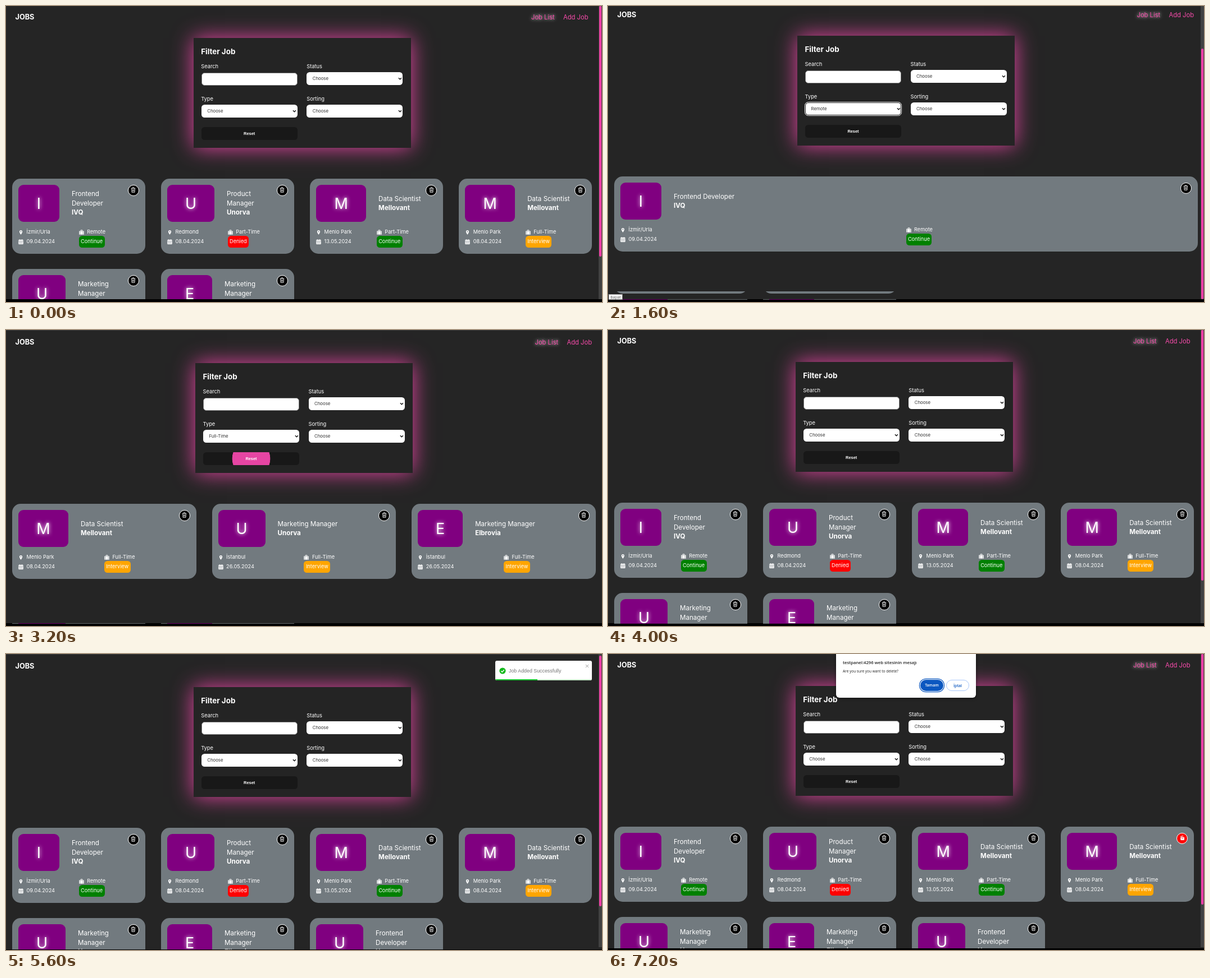
Animation of 1061x528 px, one loop 8 s. Source, as an HTML page:

```html
<!DOCTYPE html>
<html lang="en">
<head>
<meta charset="utf-8">
<title>Jobs</title>
<style>
html, body { margin: 0; width: 100%; height: 100%; overflow: hidden; background: #000; }
#stage { position: relative; width: 1061px; height: 528px; overflow: hidden; background: #000;
  color: #fff; font: 9.2px Inter, sans-serif; }
#stage div, #stage svg { position: absolute; box-sizing: border-box; }
.t { line-height: 20px; white-space: nowrap; }
.page { left: 0; top: 0; width: 1061px; background: #252525; overflow: hidden; }
.panel { width: 387px; background: #242424; box-shadow: 0 0 36px #e645a3; }
.field { width: 171px; height: 23px; border-radius: 5.5px; background: #fff; color: #333; }
.input { border: 1px solid #777; border-width: .6px 1.3px 1.3px .6px; }
.focus { outline: 1px solid #fff; box-shadow: inset 0 0 0 1px #111; outline-offset: .4px; }
.button { width: 171px; height: 23px; border-radius: 5.5px; background: #181818;
  font: bold 7.4px/23px "Liberation Sans", Arial, sans-serif; text-align: center; }
.hover { background: radial-gradient(circle, #e645a3 33.5px, #181818 34.2px); }
.link { color: #f84bab; font-size: 11.2px; }
.active { text-shadow: 0 0 5px #aaa, 0 0 9px #999; }
.card { height: 133.5px; border-radius: 15px; background: #727a7f; }
.avatar { left: 11px; top: 11px; height: 66px; border-radius: 9px; background: #800080;
  font-size: 27px; line-height: 67px; text-align: center; text-shadow: 0 0 7px #fff; }
.role { top: 11px; height: 66px; display: flex; flex-direction: column; justify-content: center;
  font-size: 11.6px; line-height: 16.5px; }
.badge { top: 102px; height: 20.5px; padding: 0 3.4px; border-radius: 5.5px; line-height: 20.5px; }
.trash { top: 10.5px; width: 20px; height: 20px; border-radius: 50%; background: #000; border: 1.4px solid #fff; }
.alert { background: #f00; }
.tip { left: 1px; top: 513.5px; width: 25px; height: 10px; background: #fff; border: .6px solid #999;
  color: #555; font: 6.6px/9px "Open Sans", sans-serif; text-align: center; }
.toast { left: 871px; top: 12px; width: 172px; height: 35px; border-radius: 3px; background: #fff; overflow: hidden; }
.dialog { left: 406px; top: -8px; width: 249px; height: 86px; border-radius: 6px; background: #fff;
  box-shadow: 0 1px 5px #0008; color: #222; font-family: "Open Sans", sans-serif; }
.pill { top: 54px; width: 41px; height: 20px; border-radius: 10px; font: 600 6.9px/20px "Open Sans", sans-serif; text-align: center; }
</style>
</head>
<body>
<div id="stage"></div>
<script>
const stage = document.getElementById('stage');
const avatarWidth = { I: 73, U: 84, M: 89, E: 80 };
const badgeColor = { Continue: 'green', Denied: 'red', Interview: 'orange' };

const jobs = [
  ['Frontend Developer', 'IVQ', 'İzmir/Urla', 'Remote', '09.04.2024', 'Continue'],
  ['Product Manager', 'Unorva', 'Redmond', 'Part-Time', '08.04.2024', 'Denied'],
  ['Data Scientist', 'Mellovant', 'Menlo Park', 'Part-Time', '13.05.2024', 'Continue'],
  ['Data Scientist', 'Mellovant', 'Menlo Park', 'Full-Time', '08.04.2024', 'Interview'],
  ['Marketing Manager', 'Unorva', 'İstanbul', 'Full-Time', '26.05.2024', 'Interview'],
  ['Marketing Manager', 'Elbrovia', 'İstanbul', 'Full-Time', '26.05.2024', 'Interview'],
  ['Frontend Developer', 'Unorva', 'Ankara', 'Full-Time', '27.05.2024', 'Continue']
];

// y: page offset, bar: top of the scrollbar thumb, h: visible page height
const scenes = [
  { y: 0, bar: 0 },
  { y: -89.5, bar: 76, tip: 1, strip: 1 },
  { y: -4, type: 'Remote', focus: 1, oldBar: 76, tip: 1, strip: 1, remnant: 1 },
  { y: 2, type: 'Part-Time', strip: 1 },
  { y: 2, type: 'Full-Time', hover: 1, strip: 1 },
  { y: 0, bar: 0, strip: 1 },
  { y: 0, add: 1, tip: 1, strip: 1, h: 524 },
  { y: 2, bar: 3, added: 1, toast: 1, h: 527 },
  { y: 0, bar: 0, added: 1, h: 525 },
  { y: 0, bar: 0, added: 1, dialog: 1, h: 525 }
];

const box = (cls, css, inner = '') => `<div class="${cls}" style="${css}">${inner}</div>`;
const at = (x, y) => `left:${x}px;top:${y}px;`;
const rect = (x, y, w, h, color) => box('', `${at(x, y)}width:${w}px;height:${h}px;background:${color}`);
// y is the middle of the line
const text = (x, y, str, css = '', cls = '') => box('t ' + cls, at(x, y - 10) + css, str);
const svg = (x, y, w, h, inner) =>
  `<svg style="${at(x, y)}" width="${w}" height="${h}" viewBox="0 0 ${w} ${h}" fill="none">${inner}</svg>`;

const icons = {
  pin: '<path d="M4.5 9C3 6.8 1.9 5.2 1.9 3.6a2.6 2.6 0 0 1 5.2 0C7.1 5.2 6 6.8 4.5 9z" fill="#fff"/><circle cx="4.5" cy="3.6" r="1" fill="#727a7f"/>',
  date: '<path d="M.8 1.4h7.4v7.2H.8zM2.6.2v2M6.4.2v2" fill="#fff" stroke="#fff"/><path d="M.5 3.2h8M1.5 5h6M1.5 7h6" stroke="#727a7f" stroke-width=".9" stroke-dasharray="1.4 .8"/>',
  bag: '<path d="M.3 2.4h8.4v6.3H.3z" fill="#fff"/><path d="M3 2.3V.9h3v1.4" stroke="#fff"/><path d="M2.1 2.4v6.3M6.9 2.4v6.3" stroke="#727a7f" stroke-width=".6"/>',
  trash: '<path d="M.8 2.2h7.4M3.2 2V.9h2.6V2M1.6 2.4l.4 6.9h5l.4-6.9M3.6 4v3.8M5.4 4v3.8" stroke="#fff" stroke-width=".9"/>',
  open: '<path d="M1.8 4h5.6v4.6H1.8zM1 2.6l5-1.2" fill="#fff" stroke="#fff"/><path d="M3 5l1.5 1.4L6.2 4.6" stroke="#f00" stroke-width=".8"/>'
};
const icon = (name, x, y) => svg(x, y, 9, 10, icons[name]);

const label = (x, y, str) => text(x, y, str, 'font-size:9.3px');
const value = (x, str) => text(x, 11, str, 'font-size:7.8px');
const input = (x, y, str = '', focus) =>
  box('field input' + (focus ? ' focus' : ''), at(x, y), value(9, str));
const select = (x, y, str, focus) => box('field' + (focus ? ' focus' : ''), at(x, y),
  value(10.5, str) + svg(162.5, 9, 7, 6, '<path d="M.9 1.2l2.5 2.6 2.5-2.6" stroke="#111" stroke-width="1.4"/>'));
const button = (x, y, str, hover) => box('button' + (hover ? ' hover' : ''), at(x, y), str);

function panel(x, y, h, title, inner) {
  return box('panel', at(x, y) + `height:${h}px`,
    text(13.5, 23.5, title, 'font-size:13.4px;font-weight:700') + inner);
}

function filterPanel(s, x) {
  return panel(x, 57 + s.y, 195.5, 'Filter Job',
    label(13.5, 50.5, 'Search') + input(14, 61.5) +
    label(201.5, 50.5, 'Status') + select(201.5, 61, 'Choose') +
    label(13.5, 108.5, 'Type') + select(14, 118.5, s.type || 'Choose', s.focus) +
    label(201.5, 108.5, 'Sorting') + select(201.5, 118.5, 'Choose') +
    button(14, 158.5, 'Reset', s.hover));
}

function addPanel(x) {
  return panel(x, 170, 213, 'Add New Job',
    label(13.5, 51, 'Position') + input(14, 62, 'Frontend Developer') +
    label(201.5, 51, 'Company') + input(202, 62, 'Unorva') +
    label(13.5, 108.5, 'Location') + input(14, 119, 'Ankara', true) +
    label(201.5, 108.5, 'Status') + select(201.5, 119, 'Continue') +
    label(13.5, 166, 'Type') + select(14, 176, 'Full-Time') +
    button(201.5, 159.5, 'Add'));
}

function card([role, company, place, type, date, status], x, y, w, alert) {
  const aw = avatarWidth[company[0]], mid = w / 2;
  return box('card', at(x, y) + `width:${w}px`,
    box('avatar', `width:${aw}px`, company[0]) +
    box('role', `left:${aw + 33}px;width:${w < 300 ? 82 : 150}px`, `<span>${role}</span><b>${company}</b>`) +
    box('trash' + (alert ? ' alert' : ''), `left:${w - 31}px`, icon(alert ? 'open' : 'trash', 4.1, 3.6)) +
    icon('pin', 11, 90.5) + text(25.5, 95, place) +
    icon('date', 11, 107.5) + text(25.5, 112, date) +
    icon('bag', mid, 90.5) + text(mid + 14.5, 95, type) +
    box('badge', `left:${mid}px;background:${badgeColor[status]}`, status));
}

function cards(s, width) {
  const list = jobs.slice(0, s.added ? 7 : 6).filter(j => !s.type || j[3] === s.type);
  const cols = Math.min(4, list.length), gap = 27.7, w = (width - gap * (cols - 1)) / cols;
  return list.map((job, i) => card(job, 11 + i % cols * (w + gap),
    308 + s.y + 161 * Math.floor(i / cols), w, s.dialog && i === 3)).join('');
}

const scrollbar = top => rect(1054.5, 0, 6.5, 523, '#424242') +
  box('', `${at(1056, top)}width:3.6px;height:447px;border-radius:2px;background:#f83fa8`);

const toast = () => box('toast', '',
  svg(7, 12, 12, 12, '<circle cx="6" cy="6" r="5.6" fill="#12b81b"/><path d="M3.2 6.2l2 2 3.6-4" stroke="#fff" stroke-width="1.3"/>') +
  text(24, 17.5, 'Job Added Successfully', 'color:#757575;font-size:8.85px;font-family:"Liberation Sans",Arial,sans-serif'.replace(/"/g, "'")) +
  svg(160, 6, 7, 7, '<path d="M1 1l5 5M6 1L1 6" stroke="#888" stroke-width=".9"/>') +
  rect(0, 32.5, 172, 2.5, '#cdf3cf') + rect(0, 32.5, 75, 2.5, '#16c52e'));

const dialog = () => box('dialog', '',
  text(12, 22.5, 'testpanel:4296 web sitesinin mesajı', 'font-size:7.7px;font-weight:600') +
  text(12, 39, 'Are you sure you want to delete?', 'font-size:6.5px') +
  box('pill', 'left:150px;color:#fff;background:#0b57c0;box-shadow:0 0 0 1px #fff,0 0 0 2.2px #0b57c0', 'Tamam') +
  box('pill', 'left:196px;color:#0b57c0;border:.8px solid #a8c7fa;line-height:19px', 'İptal'));

function strip(y) {
  const bar = (x, a) => rect(x, y, 237, 1, '#62686c') + rect(x + 11, y, a, 1, '#680068');
  return bar(11, 84) + bar(276, 80);
}

const remnant = x => box('', `${at(x, 509)}width:237.5px;height:4px;overflow:hidden`,
  box('card', 'top:-129.5px;width:237.5px'));

function draw(s) {
  const hasBar = s.bar !== undefined, shift = hasBar ? 0 : 6.5;
  const px = hasBar ? 333.7 : 337, h = s.h || 523;
  const link = (x, str, on) => text(x + shift, 19.7 + s.y, str, '', 'link' + (on ? ' active' : ''));
  const page =
    (s.add ? addPanel(px) : filterPanel(s, px) + cards(s, 1032.5 + shift)) +
    text(16.5, 19.5 + s.y, 'JOBS', 'font-size:12.7px;font-weight:700') +
    (s.toast ? '' : link(935, 'Job List', !s.add) + link(992, 'Add Job', s.add)) +
    (s.y === 2 ? rect(0, 0, 1061, 1, '#3c3c3c') : '') +
    (s.remnant ? remnant(11) + remnant(276) : '') +
    (hasBar ? scrollbar(s.bar) : s.oldBar ? scrollbar(s.oldBar) : '');
  stage.innerHTML = box('page', `height:${h}px`, page) +
    (s.strip ? strip(h) : '') + (s.tip ? box('tip', '', 'Başlat') : '') +
    (s.toast ? toast() : '') + (s.dialog ? dialog() : '');
}

let shown = -1;
function tick() {
  const i = Math.floor(performance.now() / 800) % scenes.length;
  if (i !== shown) draw(scenes[shown = i]);
  requestAnimationFrame(tick);
}
tick();
</script>
</body>
</html>
```
